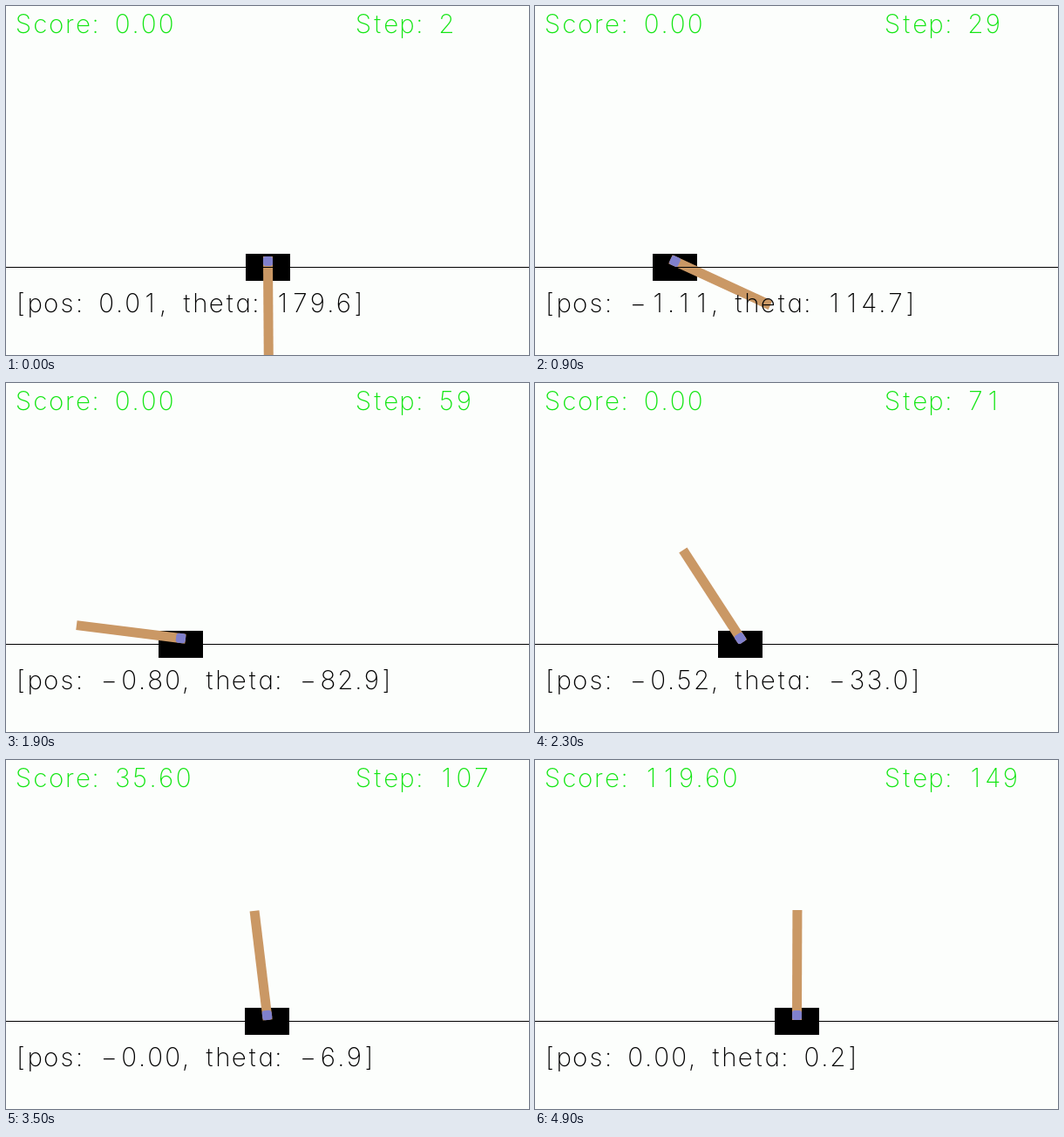
Animation, 600 px wide and 400 px high, one loop 5000 ms. Source, as an HTML page:

```html
<!DOCTYPE html>
<html lang="en">
<head>
<meta charset="utf-8">
<title>Cart pole swing-up</title>
<style>
  html, body { margin: 0; width: 100%; height: 100%; overflow: hidden; background: #fcfefc; }
  svg { display: block; width: 600px; height: 400px; }
  text {
    font: 200 29.5px Inter, Lato, sans-serif;
    font-feature-settings: "cv11";
    text-anchor: middle;
  }
  .green { fill: #14e614; }
</style>
</head>
<body>
<svg viewBox="0 0 600 400">
  <rect id="cart" x="-25.5" y="284" width="51" height="31"/>
  <g id="pole">
    <rect x="-5.5" y="-120.5" width="11" height="126" fill="#ca9865"/>
    <rect x="-5.5" y="-5.5" width="11" height="11" rx="3" fill="#8080cc"/>
  </g>
  <rect y="299" width="600" height="1"/>
  <text id="score" class="green" y="31"></text>
  <text id="step" class="green" y="31"></text>
  <text id="state" y="351"></text>
</svg>
<script>
const FRAME_MS = 100, FRAMES = 50;

// Key poses: frame, cart position and speed, pole angle and spin (per frame)
const poses = [
  { f: 0,  pos: 0.005,  vel: -0.012, angle: 179.6, spin: -1 },
  { f: 5,  pos: -0.513, vel: -0.2,   angle: 139.3, spin: -14 },
  { f: 14, pos: -1.243, vel: 0.05,   angle: 171.6, spin: 21 },
  { f: 19, pos: -0.798, vel: 0.1,    angle: 277.1, spin: 18.5 },
  { f: 27, pos: -0.318, vel: 0.058,  angle: 343.9, spin: 2 },
  { f: 35, pos: -0.001, vel: 0.016,  angle: 353.1, spin: 0.95 },
  { f: 49, pos: 0.003,  vel: -0.006, angle: 360.2, spin: 0.3 }
];

const $ = id => document.getElementById(id);
const clamp = (v, lo, hi) => Math.min(Math.max(v, lo), hi);

// Cubic Hermite from p to q with end slopes m and n over h frames
function hermite(p, m, q, n, h, u) {
  return p + (q - p) * u * u * (3 - 2 * u)
    + h * u * (1 - u) * (m * (1 - u) - n * u);
}

function poseAt(f) {
  const k = poses.findIndex(p => p.f >= f) || 1;
  const a = poses[k - 1], b = poses[k], h = b.f - a.f, u = (f - a.f) / h;
  return {
    pos: hermite(a.pos, a.vel, b.pos, b.vel, h, u),
    angle: hermite(a.angle, a.spin, b.angle, b.spin, h, u)
  };
}

// Reward per step grows as the pole gets closer to upright
function scoreAt(n) {
  return (n > 75 ? 0.1 : 0) + 0.5 * clamp(n - 75, 0, 11)
    + clamp(n - 86, 0, 12) + 2 * Math.max(n - 98, 0);
}

// Plotter-style spacing: every character is centred in a cell set by its kind
function cell(ch) {
  if (/[:.,]/.test(ch)) return 10;
  if (/[tr]/.test(ch)) return 12.5;
  if (/[[\]]/.test(ch)) return 14;
  if (/[a-z]/.test(ch)) return 18.4;
  return ch === " " ? 16 : ch === "−" ? 26 : 20;
}

function write(id, left, str) {
  let x = left;
  const xs = [...str].map(ch => {
    const w = cell(ch);
    x += w;
    return x - w / 2;
  });
  $(id).setAttribute("x", xs.join(" "));
  $(id).textContent = str;
}

const num = (v, d) => v.toFixed(d).replace("-", "−");

function draw(f) {
  const n = 2 + 3 * f, { pos, angle } = poseAt(f);
  const x = Math.floor(300 + 125 * pos) + 0.5;
  const theta = angle > 180 ? angle - 360 : angle;
  $("cart").setAttribute("transform", `translate(${x} 0)`);
  $("pole").setAttribute("transform", `translate(${x} 292.5) rotate(${angle})`);
  write("score", 10, "Score: " + scoreAt(n).toFixed(2));
  write("step", 400, "Step: " + n);
  write("state", 10, `[pos: ${num(pos, 2)}, theta: ${num(theta, 1)}]`);
}

const start = performance.now();
let shown = -1;

function tick() {
  const f = Math.floor((performance.now() - start) / FRAME_MS) % FRAMES;
  if (f !== shown) draw(shown = f);
  requestAnimationFrame(tick);
}
tick();
</script>
</body>
</html>
```
